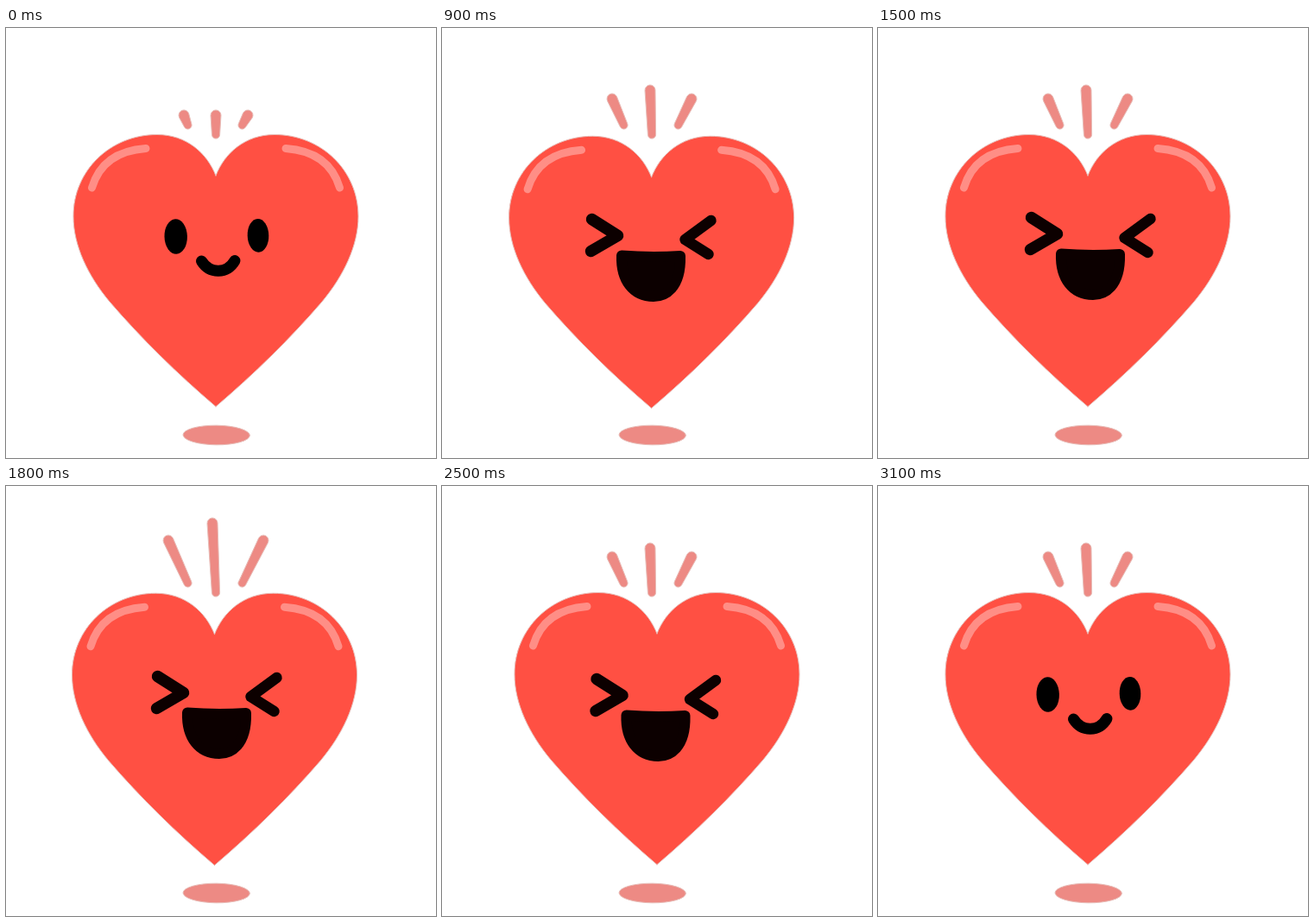
Recreate the animation shown at these times as an HTML page with a canvas. Size 498 px wide and 498 px high, loop 3.2 s.

```html
<!DOCTYPE html>
<html lang="en">
<head>
<meta charset="utf-8">
<title>Laughing heart</title>
<style>
  html, body { margin: 0; width: 100%; height: 100%; overflow: hidden; background: #fff; }
  canvas { display: block; }
</style>
</head>
<body>
<canvas id="stage" width="498" height="498"></canvas>
<script>
const ctx = document.getElementById('stage').getContext('2d');
const STEP = 100, LOOP = 3200, SHAKE = 12;
const LAUGH_FROM = 3, SHAKE_FROM = 7, LAUGH_TO = 30;
const RED = '#ff5043', PINK = '#ed8a84', SHINE = '#ff8e86', EDGE = '#e8bcb7';
const INK = '#000', LAUGH_INK = '#0c0000';
const MID = 243;

// Key poses of one shake: [step, x, y]
const HEART_KEYS = [[0, 2, 3], [1, 6, 0], [3, 0, 0], [7, -2, 1], [SHAKE, 2, 3]];
const FACE_KEYS = [[0, 0, 3], [1, 1.5, 4], [3, 0, 0], [9, -4, 2], [SHAKE, 0, 3]];

const mix = (a, b, k) => a + (b - a) * k;

function pose(keys, t) {
  const i = keys.findIndex(key => key[0] > t);
  const [t0, x0, y0] = keys[i - 1], [t1, x1, y1] = keys[i];
  const k = (t - t0) / (t1 - t0);
  return [mix(x0, x1, k), mix(y0, y1, k)];
}

function fillEdged(color) {
  ctx.fillStyle = color;
  ctx.strokeStyle = EDGE;
  ctx.lineWidth = 1;
  ctx.fill();
  ctx.stroke();
}

function brush(path, width, color) {
  ctx.lineWidth = width;
  ctx.strokeStyle = color;
  ctx.stroke(new Path2D(path));
}

function oval(x, y, rx, ry, tilt = 0) {
  ctx.beginPath();
  ctx.ellipse(x, y, rx, ry, tilt, 0, Math.PI * 2);
}

function at([x, y], draw, flip = 1) {
  ctx.save();
  ctx.translate(x, y);
  ctx.scale(flip, 1);
  draw();
  ctx.restore();
}

// side is -1, 0 or 1; size grows from 0 to 2
function drawRay(side, size) {
  const outer = Math.abs(side), q = Math.PI / 2;
  const x0 = MID + side * (37 + 9 * size) - 2 * size * (1 - outer);
  const y0 = 101 - size * (29 - 10 * outer);
  const x1 = MID - outer + side * 31.5, y1 = 123.5 - 11 * outer;
  const a = Math.atan2(y1 - y0, x1 - x0);
  ctx.beginPath();
  ctx.arc(x0, y0, 6, a + q, a + 3 * q);
  ctx.arc(x1, y1, 4.6, a - q, a + q);
  ctx.closePath();
  fillEdged(PINK);
}

// One half of the outline, from notch to tip, s mirrors it
function halfHeart(s) {
  ctx.moveTo(0, 171);
  ctx.bezierCurveTo(s * 10, 145, s * 34, 123.5, s * 68, 123.5);
  ctx.bezierCurveTo(s * 122, 123.5, s * 165, 165, s * 165, 218);
  ctx.bezierCurveTo(s * 165, 252, s * 148, 287, s * 123, 317);
  ctx.bezierCurveTo(s * 86, 360, s * 44, 401, 0, 438.5);
}

function drawHeart() {
  at([MID, 0], () => {
    ctx.beginPath();
    halfHeart(-1);
    halfHeart(1);
    fillEdged(RED);
  });
  for (const flip of [-1, 1]) {
    at([MID, 0], () => brush('M81 139.5 Q131 143 143.5 185', 9, SHINE), flip);
  }
}

function drawSmile() {
  ctx.fillStyle = INK;
  oval(196.7, 241.5, 13.2, 20.3, -0.03);
  ctx.fill();
  oval(292, 240.3, 12.3, 19.4, -0.03);
  ctx.fill();
  brush('M226.5 270 C236 285 256 285 265 269.5', 13, INK);
}

function drawLaugh() {
  brush('M177.5 219.5 L207.5 238.5 L176.5 256.5', 13.5, LAUGH_INK);
  brush('M315.5 221 L285.5 243 L312.5 260', 12.5, LAUGH_INK);
  const mouth = 'M212 261.5 Q245 264 280 262 C281 300 262 309 249 309 C225 309 211 290 212 261.5Z';
  ctx.fillStyle = LAUGH_INK;
  ctx.fill(new Path2D(mouth));
  brush(mouth, 12, LAUGH_INK);
}

function render(step) {
  const laughing = step >= LAUGH_FROM && step < LAUGH_TO;
  const shaking = step >= SHAKE_FROM && step < LAUGH_TO;
  let heart = [0, 0], face = [0, 0];
  if (shaking) {
    heart = pose(HEART_KEYS, step % SHAKE);
    face = pose(FACE_KEYS, step % SHAKE);
  } else if (step < SHAKE_FROM) {
    heart = [Math.sin(step / 8 * Math.PI), 0];
  }

  ctx.fillStyle = '#fff';
  ctx.fillRect(0, 0, 498, 498);
  ctx.lineCap = ctx.lineJoin = 'round';

  oval(243.7, 471.5, 38.7, 11.3, 0.01);
  fillEdged(PINK);
  const size = 2 - Math.abs(step % 4 - 2);
  for (const side of [-1, 0, 1]) drawRay(side, size);
  at(heart, drawHeart);
  at(face, laughing ? drawLaugh : drawSmile);
}

const start = performance.now();
function tick() {
  const t = (performance.now() - start) % LOOP;
  render(Math.floor(t / STEP));
  requestAnimationFrame(tick);
}
tick();
</script>
</body>
</html>
```
